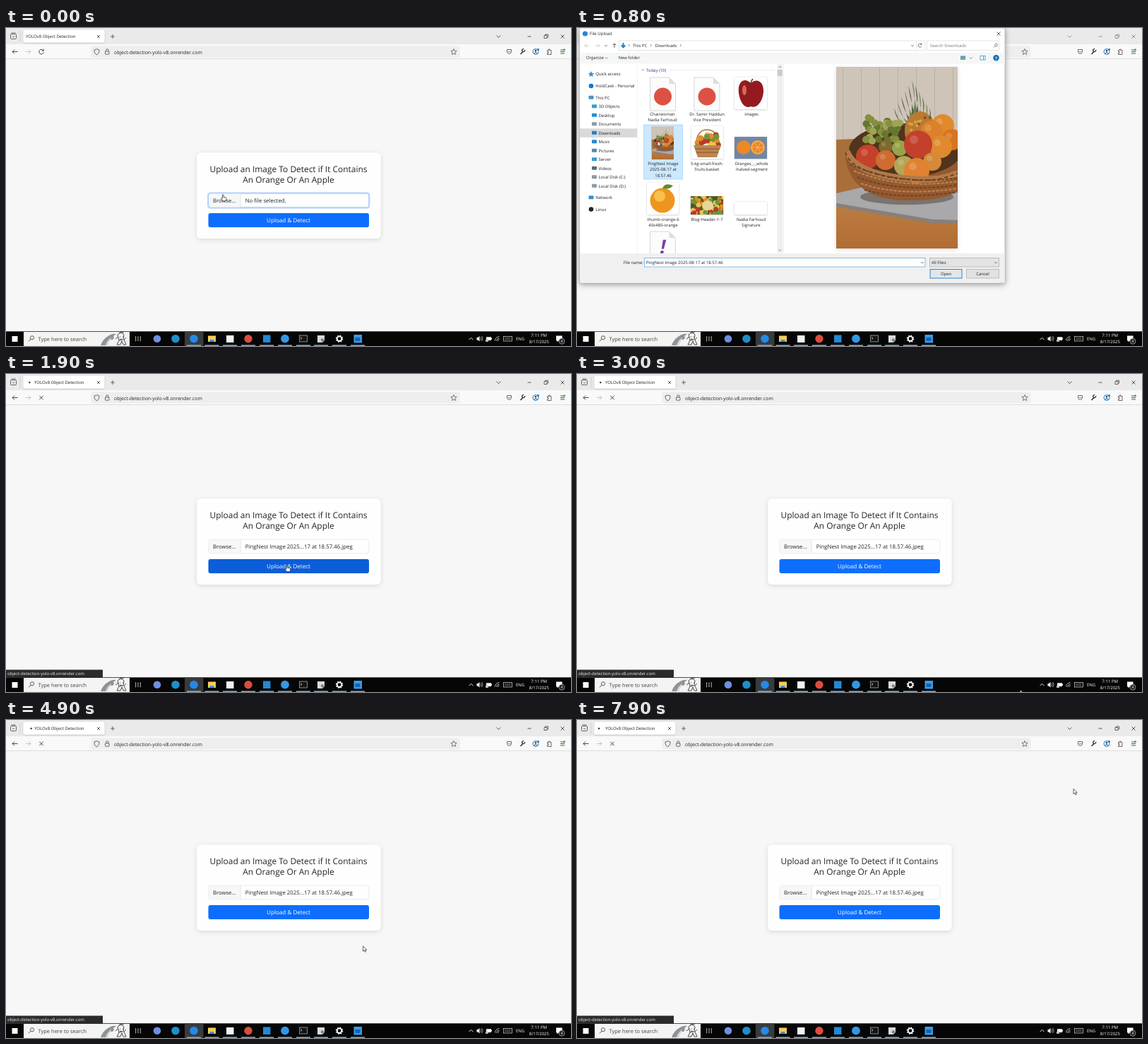
Animation, 800 px wide and 450 px high, one loop 8000 ms. Source, as an HTML page:

```html
<!DOCTYPE html>
<html lang="en">
<head>
<meta charset="utf-8">
<title>Upload demo</title>
<style>
html, body { margin: 0; width: 100%; height: 100%; overflow: hidden; background: #f7f7f7; }
svg { display: block; width: 800px; height: 450px; }
text { font-family: "Open Sans", "Noto Sans", sans-serif; text-rendering: geometricPrecision; white-space: pre; }
</style>
</head>
<body>
<svg id="stage" viewBox="0 0 800 450" xmlns="http://www.w3.org/2000/svg"></svg>
<script>
const rect = (x, y, w, h, fill, more = '') =>
  `<rect x="${x}" y="${y}" width="${w}" height="${h}" fill="${fill}" ${more}/>`;
const disc = (x, y, r, fill, more = '') => `<circle cx="${x}" cy="${y}" r="${r}" fill="${fill}" ${more}/>`;
const oval = (x, y, rx, ry, fill, more = '') =>
  `<ellipse cx="${x}" cy="${y}" rx="${rx}" ry="${ry}" fill="${fill}" ${more}/>`;
const line = (d, color = '#444', w = 0.8, more = '') =>
  `<path d="${d}" fill="none" stroke="${color}" stroke-width="${w}" ${more}/>`;
const shape = (d, fill, more = '') => `<path d="${d}" fill="${fill}" ${more}/>`;
const text = (x, y, size, str, fill = '#222', anchor = 'start', more = '') =>
  `<text x="${x}" y="${y}" font-size="${size}" fill="${fill}" text-anchor="${anchor}" ${more}>${str.replace(/&/g, '&amp;')}</text>`;
const mid = (x, y, size, str, fill) => text(x, y, size, str, fill, 'middle');
const group = (id, body, more = '') => `<g id="${id}" ${more}>${body}</g>`;
const many = (n, f) => Array.from({ length: n }, (_, i) => f(i)).join('');
const border = color => `stroke="${color}" stroke-width=".7"`;
const soft = 'filter="url(#soft)"';

let seed = 7;
const rnd = () => (seed = (seed * 16807) % 2147483647) / 2147483647;

const HOST = 'object-detection-yolo-v8.onrender.com';
const PICKED = 'PingNest Image 2025-08-17 at 18.57.46';
const SMALL = 5.95;

function browser() {
  return rect(0, 0, 800, 450, '#f7f7f7') +
    rect(0, 0, 800, 23, '#eaeaeb') +
    rect(0, 23, 800, 20.5, '#f9f9f9') +
    rect(0, 43.3, 800, 0.7, '#d2d2d4') +
    rect(6.5, 8.5, 8, 7, 'none', 'rx="1.2" stroke="#444" stroke-width=".8"') +
    line('M7.5 7h6M9 11.5l1.6 1.4 1.6-1.4') +
    line('M20 4v16', '#c4c4c6', 0.7) +
    rect(24.5, 2.5, 115, 18, '#fff', `rx="2.5" ${soft}`) +
    line('M129 10l4 4m0-4l-4 4', '#333') +
    line('M148 12h6m-3-3v6') +
    group('controls',
      line('M694.5 10.5l3 3 3-3M738.5 12h5M785.5 9.5l5 5m0-5l-5 5', '#333') +
      line('M762 10.5h4v4h-4zM763.5 10.3v-1.2h4v4h-1.2', '#333', 0.7)) +
    line('M9 33.5h7.5M12 30.5l-3 3 3 3', '#333', 0.9) +
    line('M28 33.5h7M32 30.5l3 3-3 3', '#bbb', 0.9) +
    rect(120.5, 25.5, 522, 16, '#eeeeef', 'rx="2.5"') +
    line('M128.5 29.8l3.5 1.2c0 4-1 5.5-3.5 6.8-2.5-1.3-3.5-2.8-3.5-6.8z') +
    rect(140.5, 33, 5.5, 4.2, 'none', 'rx=".8" stroke="#444" stroke-width=".8"') +
    line('M141.6 33v-1.5a1.7 1.7 0 0 1 3.4 0v1.5') +
    text(153, 36.6, 6.88, HOST) +
    line('M634 29.5l1.2 2.7 2.9.3-2.2 2 .6 2.9-2.5-1.5-2.5 1.5.6-2.9-2.2-2 2.9-.3z', '#444', 0.7) +
    line('M709.5 30.5h6v2.5a3 3.5 0 0 1-6 0zM711 32.8l1.5 1.5 1.5-1.5') +
    line('M728.5 37l3.5-3.8', '#333', 1.6) + line('M734.6 31a2 2 0 1 1-1.5-1.4', '#333', 1.3) +
    disc(750, 33.5, 4, '#fff', 'stroke="#1677c8" stroke-width="1"') +
    disc(750, 32.3, 1.3, '#333') + line('M747.8 35.8q2.2-2.4 4.4 0', '#333', 1) + disc(753.5, 30.5, 1.5, '#1677c8') +
    line('M766.5 31.5h2v-1.5h1.5v1.5h2v6h-5.5v-2h1.5v-2h-1.5z') +
    line('M785 31h6M785 33.5h6M785 36h6', '#444', 0.9) + disc(790.5, 30.8, 1.5, '#2fae68') +
    group('reload', line('M52.6 31.6a3.3 3.3 0 1 0 .7 2.6M53.2 29.8v2.4h-2.4', '#333', 0.9)) +
    group('stop', line('M47.3 30.8l5.4 5.4m0-5.4l-5.4 5.4', '#333', 0.9) + disc(0, 12, 1.2, '#333', 'id="dot"')) +
    text(28, 14.1, 6.03, 'YOLOv8 Object Detection', '#222', 'start', 'id="title"');
}

function card() {
  return rect(270, 176.5, 260.5, 121.5, '#fefefe', 'rx="6" filter="url(#shade)"') +
    mid(400, 203.8, 11.95, 'Upload an Image To Detect if It Contains', '#212529') +
    mid(400, 219, 11.95, 'An Orange Or An Apple', '#212529') +
    group('glow', rect(285, 232.3, 230.5, 23.4, '#c2dcfb', 'rx="4.5"')) +
    rect(286.8, 234.2, 227, 19.6, '#fefefe', 'id="field" rx="3" stroke-width=".7"') +
    shape('M290 234.6h42v18.9h-42a2.7 2.7 0 0 1-2.7-2.7v-13.5a2.7 2.7 0 0 1 2.7-2.7z', '#f6f7f8') +
    line('M332 234.5v19', '#d6dade', 0.7) +
    text(293, 247, 7.7, 'Browse...', '#212529') +
    text(338.7, 247, 7.83, '', '#212529', 'start', 'id="choice"') +
    rect(286.5, 262, 227.5, 20, '#0d6efd', 'id="send" rx="3"') +
    mid(400, 275, 8.1, 'Upload & Detect', '#fff') +
    group('status', rect(0, 418.5, 137, 11, '#2b2a2d') + text(2, 426.2, 6, HOST, '#f5f5f5'));
}

function taskbar() {
  const running = [266, 291.5, 317, 343, 369, 395, 421, 446, 472, 498];
  return rect(0, 429.3, 800, 20.7, '#060606') +
    rect(8.5, 436, 8, 8, '#fff') +
    rect(25, 430, 150, 20, '#f4f4f4') +
    disc(37, 438.3, 2.6, 'none', 'stroke="#333" stroke-width=".8"') + line('M35 440.3l-3 3', '#333', 0.9) +
    text(45.5, 442.5, 7.5, 'Type here to search', '#444') +
    shape('M134 449q3-9 12-14 5-3 10-2l-4 3q2 2-1 5l-3 0q-3 1-4 8z', '#8e9496') +
    shape('M141 449q2-7 8-11l-1 4q-3 2-4 7z', '#d5d8d8') +
    line('M158 434q5-5 9 0l-1 7-6 1zM160 442l-3 6h5l2-5 2 5h4l-3-7 3-3M159 437l-4 3M161 437h1m3 0h1M161 440q2 1 3 0M160 432l2-2 3 1 2-1', '#222') +
    rect(253, 429.3, 26.5, 20.7, '#393b3d') +
    line('M183.5 436v7.5M190.5 436v7.5M185.5 437.5h3M185.5 442h3M185.5 439.8h3', '#ccc') +
    disc(214, 439.7, 5.3, '#6f8fe0') + disc(240, 439.7, 5.8, '#1d8fca') + disc(266, 439.7, 5.8, '#2489e8') +
    rect(286, 435.5, 11, 8.5, '#f7cd58') + rect(288.5, 441, 6, 3, '#3b93d8') +
    rect(312, 435, 10.5, 10, '#f2f2f2') + disc(343, 439.7, 5.7, '#dc4d3c') +
    rect(364, 434.5, 10.5, 10.5, '#2489d6') + disc(395, 439.7, 5.9, '#3198e6') +
    rect(415.5, 435, 11, 9, '#151515', border('#bbb')) + line('M417 437.5l2 1.5-2 1.5', '#eee', 0.7) +
    shape('M441 435h10v7l-3 3h-7z', '#d8dadb') + disc(448, 441.5, 2.2, '#77848b') +
    disc(472, 439.7, 3.3, 'none', 'stroke="#fff" stroke-width="1.8"') +
    disc(472, 439.7, 4.6, 'none', 'stroke="#fff" stroke-width="1.3" stroke-dasharray="1.8 1.813"') +
    rect(492.5, 434, 11.5, 11.5, '#3a9ce8') + rect(494.5, 438, 7, 5, '#1763b0') +
    running.map(x => rect(x - 10, 448.5, 20, 1.5, '#6fb4e4')).join('') +
    line('M655.5 441.3l3-3 3 3', '#fff', 0.9) +
    shape('M666.5 438h1.8l2.2-2v7.5l-2.2-2h-1.8z', '#fff') + line('M672 437.5q1.8 2 0 4.4M673.6 436q3 3.5 0 7.2', '#ddd', 0.7) +
    rect(680, 437.3, 7, 4.8, '#fff') + rect(687, 438.6, 1, 2, '#fff') + shape('M679 441h4v3h-4z', '#bbb') +
    line('M692.5 442.5q0-5 6-6M694.5 443q0-3.5 4-4.2M696.6 443q0-2 1.9-2.3', '#ddd') +
    rect(704.5, 436.5, 12, 6.5, 'none', border('#ddd')) + line('M706.5 438.7h8M706.5 440.7h8', '#ddd', 0.8, 'stroke-dasharray="1 .8"') +
    text(722, 442, 6, 'ENG', '#fff') +
    mid(754.7, 437.3, 6.05, '7:11 PM', '#fff') + mid(754.8, 446, SMALL, '8/17/2025', '#fff') +
    shape('M779 435.5h8.5v7h-5l-2 2v-2h-1.5z', '#fff') + disc(787, 443.3, 4, '#222', border('#bbb')) +
    mid(787, 445.3, 5.3, '4', '#fff');
}

// Fruit basket, drawn on a 172 by 257 sheet.
function fruitPhoto() {
  const fruit = [[151, 83, 16, '#e08a2b'], [135, 92, 16, '#dc812a'], [164, 103, 15, '#d9731f'], [148, 113, 16, '#e08a2e'],
    [70, 113, 10, '#7d6a2c'], [90, 115, 11, '#98a24c'], [116, 110, 20, '#c2402c'], [45, 127, 17, '#c5412b'],
    [70, 132, 14, '#cf6a30'], [136, 134, 13, '#d48a38'], [96, 140, 14, '#b3a656'], [114, 147, 18, '#df8231']];
  const leaf = i => {
    const x = 82 + i * 5, y = 18 + Math.abs(i - 5) * 8;
    return shape(`M103 84Q${x + 10} ${y + 30} ${x} ${y}Q${x + 4} ${y + 30} 118 84z`, i % 2 ? '#6f7f56' : '#4c6345');
  };
  return rect(0, 0, 172, 257, 'url(#wood)') +
    rect(0, 0, 172, 106, '#cfc4b8') +
    many(7, i => rect(i * 26 + 9, 0, 1, 106, '#bcb0a4')) +
    shape('M0 103L172 96V170L0 184z', '#a96f3b') +
    shape('M0 179L60 165 172 172V217L136 216 0 193z', '#a9a8aa') +
    shape('M0 193L136 216 172 217V221L134 221 0 198z', '#85807e') +
    oval(100, 184, 66, 11, '#5e5048', 'opacity=".6"') +
    shape('M12 119C14 165 45 187 95 189 135 190 160 184 172 176V105z', '#94592f') +
    oval(98, 118, 80, 38, '#50341d') +
    many(11, leaf) +
    oval(119, 91, 22, 28, '#b97a30') +
    many(28, i => disc(102 + rnd() * 34, 70 + rnd() * 38, 2, i % 2 ? '#d9a446' : '#7f5420')) +
    many(38, i => disc(42 + rnd() * 48, 72 + rnd() * 34, 5, ['#84903f', '#a0a455', '#66752f'][i % 3])) +
    fruit.map(([x, y, r, fill]) => disc(x, y, r, fill) +
      disc(x - r * 0.3, y - r * 0.35, r * 0.3, '#fff', 'opacity=".16"')).join('') +
    line('M15 119C25 148 72 157 112 159S158 154 172 151', '#b17a48', 9) +
    many(5, i => line(`M${20 + i * 5} ${138 + i * 9}Q90 ${169 + i * 5} 172 ${157 + i * 5}`, i % 2 ? '#bd8654' : '#6f4427', 2, 'stroke-dasharray="4 2"')) +
    line('M13 121C21 148 72 158 112 160S158 154 172 151', '#6b4024', 2, 'stroke-dasharray="5 4"');
}

const sheet = (x, y, mark) =>
  shape(`M${x - 18} ${y}h27l9 9v38h-36z`, '#fcfcfc', 'stroke="#bcbcbc" stroke-width=".6"') +
  shape(`M${x + 9} ${y}v9h9z`, '#ddd') + mark;

function files() {
  const labels = [
    [121, 124, ['Chairwoman', 'Nadia Farhoud']], [184, 124, ['Dr. Samir Haddun', 'Vice President']], [247, 124, ['images']],
    [122, 194, ['PingNest Image', '2025-08-17 at', '18.57.46']], [184, 194, ['5-kg-small-fresh-', 'fruits-basket']],
    [247, 194, ['Oranges_-_whole', '-halved-segment']], [122, 272.5, ['thumb-orange-6', '40x480-orange']],
    [184, 272.5, ['Blog-Header-1-7']], [246.5, 272.5, ['Nadia Farhoud', 'Signature']]];
  const colors = ['#e78b29', '#ba3a28', '#e9c655', '#6f963a'];
  return group('mark', rect(94.5, 137, 55, 77, '#cce8ff', border('#99d1ff'))) +
    sheet(121.5, 70, disc(121.5, 97, 12.5, '#dd5144')) + sheet(184, 70, disc(184, 97, 12.5, '#dd5144')) +
    rect(223, 70, 46, 45, '#fff', soft) +
    shape('M246 78C237 69 227 76 229 92 231 106 238 115 246 111 255 115 263 103 264 91 265 76 255 70 246 78z', '#951a20') +
    oval(237, 88, 3, 7, '#d66a5c') + line('M246 80q0-5 3-8', '#553a22', 1.5) +
    '<use href="#photo" transform="translate(105.5 139) scale(.183)"/>' +
    rect(162, 139, 45, 46, '#fff', soft) +
    line('M168 166Q170 143 185 144T202 166', '#a5743b', 1.5) +
    many(24, i => disc(169 + rnd() * 31, 151 + rnd() * 15, 4, colors[i % 4])) +
    shape('M165 166h39l-6 17h-27z', '#bd8550') + line('M167 171h35M169 176h31', '#865127', 1) +
    rect(223, 154, 46, 31, '#7186a4', soft) +
    disc(236, 169, 10, '#ec8927') + disc(256, 169, 10, '#f4ad38') + disc(256, 169, 7.5, '#e9832b') +
    many(6, i => line(`M256 169l${7 * Math.cos(i * 1.047)} ${7 * Math.sin(i * 1.047)}`, '#ffd386', 0.7)) +
    rect(99, 219, 45, 45, '#fff', soft) +
    disc(121, 244, 17.5, '#ed961f') + disc(117, 238, 8, '#f8bf4d') + shape('M121 227q3-9 15-4-5 6-15 4z', '#5f8c2e') +
    rect(161, 238, 46, 26, '#4b5a28', soft) +
    `<g clip-path="url(#banner)">${many(58, i => disc(161 + rnd() * 46, 238 + rnd() * 26, 1.5 + rnd() * 2.5, colors[i % 4]))}</g>` +
    oval(185, 251, 8, 7, '#e5d79c') +
    rect(223, 246, 46, 18, '#fff', soft) +
    `<g clip-path="url(#list)">${sheet(121.5, 288, text(121.5, 319, 27, '!', '#7740a4', 'middle', 'font-weight="700" font-style="italic"'))}</g>` +
    labels.map(([x, y, rows]) => rows.map((row, i) => mid(x, y + i * 8.3, SMALL, row)).join('')).join('');
}

function sidebar() {
  const rows = [['Quick access', 65, 0, '#3c91d7'], ['HoldCask - Personal', 82, 0, '#1478c8'], ['This PC', 98.5, 0, '#4297c5'],
    ['3D Objects', 111, 1, '#36a3bd'], ['Desktop', 123.5, 1, '#2292d3'], ['Documents', 136, 1, '#8a9ba7'],
    ['Downloads', 148.5, 1, '#2383c4'], ['Music', 161, 1, '#2688d8'], ['Pictures', 173.5, 1, '#568ca7'],
    ['Server', 186, 1, '#3a9cce'], ['Videos', 198.5, 1, '#596b7c'], ['Local Disk (C:)', 211, 1, '#8e9ba3'],
    ['Local Disk (D:)', 223.5, 1, '#8e9ba3'], ['Network', 240, 0, '#3a91c7'], ['Linux', 256.5, 0, '#222']];
  const icon = (i, y, sub, fill) => {
    if (i === 0) return shape('M20 61l1.3 2.7 3 .4-2.2 2 .6 3-2.7-1.5-2.7 1.5.6-3-2.2-2 3-.4z', fill);
    if (i === 1 || i === 14) return disc(20, y, 3.3, fill);
    return rect(sub ? 21 : 16.5, y - 2.7, 7, 5, fill, 'rx=".7"');
  };
  return rect(4, 142.3, 81, 12.5, '#d9d9d9') +
    rows.map(([name, y, sub, fill], i) =>
      icon(i, y, sub, fill) + text(sub ? 30.5 : 26.3, y + 2.1, SMALL, name)).join('') +
    line('M85.5 51v267', '#eee', 0.7);
}

function dialog() {
  const drop = (x, y) => line(`M${x - 2} ${y - 1}l2 2 2-2`, '#555', 0.7);
  return rect(3.5, 0, 602.5, 361, '#fff', 'filter="url(#deep)"') +
    rect(3.5, 0, 602.5, 361, '#fff', border('#aaa')) +
    disc(11.5, 8, 3.6, '#2486dc') + text(18, 10.3, 6.1, 'File Upload') +
    line('M594.5 5.5l5 5m0-5l-5 5', '#333') +
    line('M17 25h-6m2.5-2.5l-2.5 2.5 2.5 2.5M26 25h6m-2.5-2.5l2.5 2.5-2.5 2.5', '#c8c8c8', 0.9) + drop(41, 25) +
    line('M53 28v-6m-2.3 2.3l2.3-2.3 2.3 2.3', '#444', 0.9) +
    rect(59.5, 18, 433.5, 13.5, '#fff', border('#d9d9d9')) +
    line('M65.5 21v6m-2.8-2.5l2.8 2.8 2.8-2.8', '#2383c4', 2) +
    line('M73 23l1.5 1.5-1.5 1.5M104 23l1.5 1.5-1.5 1.5M146 23l1.5 1.5-1.5 1.5', '#555', 0.7) +
    text(79, 26.6, SMALL, 'This PC') + text(110.5, 26.6, SMALL, 'Downloads') + drop(475, 25) +
    line('M480.5 19v11', '#ddd', 0.7) + line('M487.5 23a2.5 2.5 0 1 0 .5 2.6M488 21.5v2h-2', '#444', 0.7) +
    rect(495.5, 18, 102, 13.5, '#fff', border('#d9d9d9')) + text(500, 26.6, SMALL, 'Search Downloads', '#777') +
    disc(593.5, 24, 1.8, 'none', border('#555')) + line('M592.2 25.5l-2 2', '#555') +
    rect(4, 35, 601.5, 15.5, '#f5f6f7') +
    text(13, 44.4, SMALL, 'Organize') + drop(41.5, 42.5) + text(58.5, 44.4, SMALL, 'New folder') +
    rect(543, 39.5, 7, 5.5, '#5898c8') + rect(544.5, 42.5, 5, 2, '#8fb368') + drop(557.5, 42.5) +
    rect(571, 39.5, 7, 5.5, '#fff', border('#247fbf')) + line('M575.5 39.5v5.5', '#247fbf') +
    disc(593.5, 42.2, 4.2, '#126fbb') + text(593.5, 44.5, 6, '?', '#fff', 'middle', 'font-weight="700"') +
    sidebar() + line('M91.5 58.5l1.8 1.8 1.8-1.8', '#555', 0.7) +
    text(98, 61.8, SMALL, 'Today (10)', '#1e3e76') + line('M131 59.7h149', '#e2e2e2', 0.7) + files() +
    rect(283.5, 51, 7.5, 267.5, '#f0f0f0') + rect(283.8, 59, 7, 9, '#c9c9c9') +
    line('M285.5 56l1.8-1.8 1.8 1.8M285.5 313.5l1.8 1.8 1.8-1.8', '#555', 0.7) +
    line('M292.5 51v267', '#e6e6e6', 0.7) +
    group('preview', rect(367, 55, 172, 257, '#fff', 'filter="url(#shade)"') + '<use href="#photo" transform="translate(367 55)"/>') +
    rect(4, 319, 601.5, 41.5, '#f0f0f0') +
    text(94, 334, SMALL, 'File name:', '#222', 'end') +
    rect(95.5, 325.5, 397.5, 12.5, '#fff', border('#56a4de')) + drop(489, 332) +
    text(97.7, 334, 6, PICKED, '#222', 'start', 'id="name"') +
    rect(499.5, 325.5, 98, 12.5, '#e3e3e3', border('#aaa')) + text(502, 334, SMALL, 'All Files') + drop(593, 332) +
    rect(500, 341.5, 45, 12.5, '#e2e6ea', 'stroke="#2b88d4" stroke-width="1"') + mid(522.5, 350, SMALL, 'Open') +
    rect(551.5, 341.5, 46, 12.5, '#e1e1e1', border('#adadad')) + mid(574.5, 350, SMALL, 'Cancel') +
    many(3, i => disc(603.5 - i * 2, 359, 0.4, '#999'));
}

const shadow = (id, dy, blur, alpha) =>
  `<filter id="${id}" x="-20%" y="-20%" width="140%" height="150%"><feDropShadow dx="0" dy="${dy}" stdDeviation="${blur}" flood-opacity="${alpha}"/></filter>`;
const clip = (id, x, y, w, h) => `<clipPath id="${id}">${rect(x, y, w, h, '#000')}</clipPath>`;
const outline = 'stroke="#222" stroke-width=".7"';

const stage = document.getElementById('stage');
stage.innerHTML =
  `<defs>${shadow('soft', 0.5, 0.8, 0.25)}${shadow('shade', 1.5, 3, 0.13)}${shadow('deep', 2, 4, 0.4)}
   ${clip('list', 88, 51, 195, 268)}${clip('banner', 161, 238, 46, 26)}${clip('sheet', 0, 0, 172, 257)}
   <linearGradient id="wood" x2="0" y2="1"><stop offset=".75" stop-color="#bd7d43"/><stop offset="1" stop-color="#b06c33"/></linearGradient>
   ${group('photo', fruitPhoto(), 'clip-path="url(#sheet)"')}</defs>` +
  browser() + card() + group('dialog', dialog()) + taskbar() +
  group('arrow', shape('M0 0v7.2l1.7-1.5 1.2 2.6 1.3-.6-1.2-2.5h2.3z', '#fff', outline)) +
  group('hand', shape('M0 0q1-.9 1.6.3v3l3.2.7q1 .3.8 1.7l-.6 3h-4.2l-2.8-3.5q.2-1.2 2 0z', '#fff', outline));

const $ = Object.fromEntries([...stage.querySelectorAll('[id]')].map(el => [el.id, el]));
const show = (el, on) => el.setAttribute('visibility', on ? 'inherit' : 'hidden');

// time, x, y
const path = [[0, 306.5, 236], [200, 306.5, 236], [600, 114, 160], [1000, 114, 160], [1100, 298, 208.5],
  [1500, 397, 271], [1900, 397, 271], [2700, 627.5, 447], [4500, 627.5, 447], [4900, 505.5, 320],
  [5400, 505.5, 320], [6000, 659, 208.5], [6300, 703, 97.5], [8000, 703, 97.5]];

function pointer(t) {
  const i = path.findIndex(([end]) => end > t);
  const [t0, x0, y0] = path[i - 1], [t1, x1, y1] = path[i];
  const u = (t - t0) / (t1 - t0);
  return `translate(${x0 + (x1 - x0) * u} ${y0 + (y1 - y0) * u})`;
}

function draw(t) {
  const picked = t >= 600, done = t >= 1100, loading = t >= 1800;
  const open = t >= 200 && !done;
  const over = t >= 1400 && t < 2000, hand = t < 300 || over;
  show($.dialog, open);
  $.controls.setAttribute('opacity', open ? 0.6 : 1);
  for (const el of [$.mark, $.preview, $.name]) show(el, picked);
  for (const el of [$.stop, $.status]) show(el, loading);
  show($.reload, !loading);
  show($.glow, t < 1700);
  show($.hand, hand);
  show($.arrow, !hand);
  $.field.setAttribute('stroke', t < 1700 ? '#86b7fe' : '#dee2e6');
  $.choice.textContent = done ? 'PingNest Image 2025...17 at 18.57.46.jpeg' : 'No file selected.';
  $.send.setAttribute('fill', over ? '#0b5ed7' : '#0d6efd');
  $.title.setAttribute('x', loading ? 40 : 28);
  $.dot.setAttribute('cx', 32.6 + 3.2 * Math.cos(2 * Math.PI * (t - 4900) / 1100 - 0.35));
  (hand ? $.hand : $.arrow).setAttribute('transform', pointer(t));
}

const start = performance.now();
function tick() {
  draw(Math.floor((performance.now() - start) % 8000 / 100) * 100);
  requestAnimationFrame(tick);
}
tick();
</script>
</body>
</html>
```
